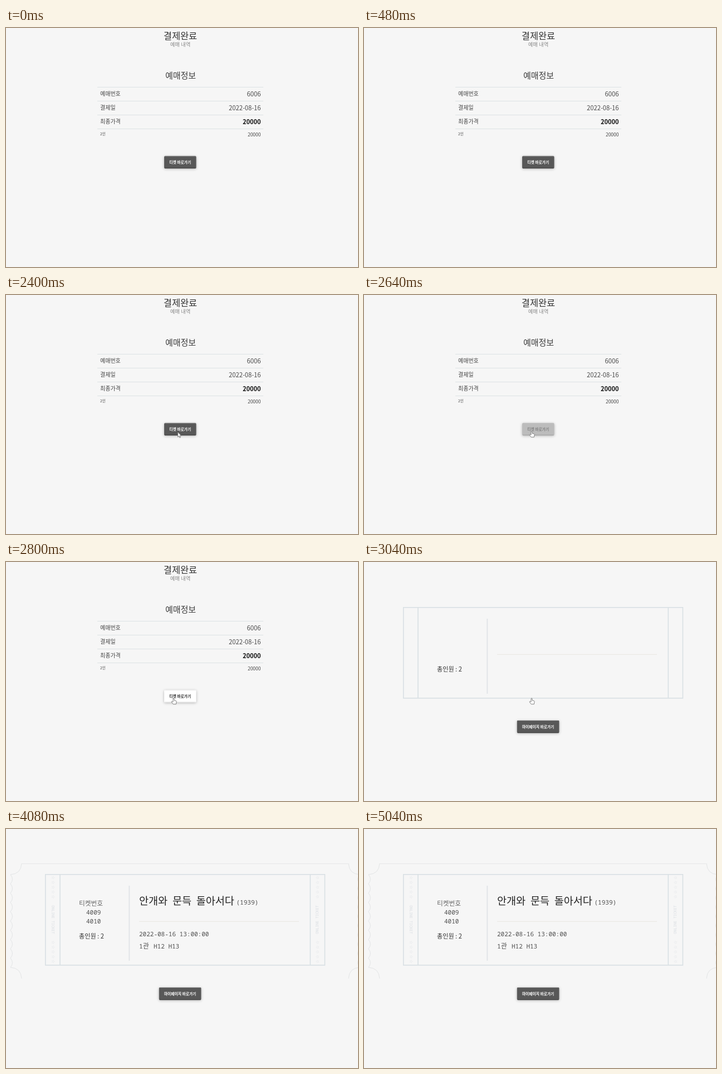
Animation of 632x430 px, one loop 5440 ms. Source, as an HTML page with a canvas:

```html
<!DOCTYPE html>
<html lang="ko">
<head>
<meta charset="utf-8">
<title>예매 티켓</title>
<style>
  html, body { margin: 0; width: 100%; height: 100%; overflow: hidden; background: #f6f6f6; }
  canvas { display: block; }
</style>
</head>
<body>
<canvas id="stage" width="632" height="430"></canvas>
<script>
const ctx = document.getElementById('stage').getContext('2d');
const LOOP = 5440, STEP = 80;
const SANS = '"Noto Sans CJK KR", "Noto Sans CJK", sans-serif';
const MONO = '"Noto Sans Mono", "Noto Sans CJK KR", monospace';
const ARROW = new Path2D('M0 0V8.6L2 6.9L3.4 10L4.7 9.4L3.4 6.4H6Z');
const HAND = new Path2D('M-1 1.2Q0-.5 1 1.2V4.5L4.4 5.3Q5.2 5.7 5 7L4.3 11.3H-.8L-3.8 7.4Q-4-.2+6-2.6 6.2L-1 7.4Z'.replace('Q-4-.2+6-2.6 6.2', 'Q-3.8 5.8-2.6 6.2'));

const mix = (a, b, p) => a + (b - a) * p;
const grey = v => `rgb(${v},${v},${v})`;

// y is the visual middle of the line of text
function text(str, x, y, size, color, { align = 'left', weight = 400, family = SANS, gap = 0 } = {}) {
  ctx.font = `${weight} ${size}px ${family}`;
  ctx.textAlign = align;
  ctx.wordSpacing = gap + 'px';
  ctx.fillStyle = color;
  ctx.fillText(str, x, y + size * 0.37);
}

function line(x1, y1, x2, y2, color, width = 1) {
  ctx.strokeStyle = color;
  ctx.lineWidth = width;
  ctx.beginPath();
  ctx.moveTo(x1, y1);
  ctx.lineTo(x2, y2);
  ctx.stroke();
}

function button(label, x, y, w, h, hover = 0) {
  ctx.save();
  ctx.shadowColor = 'rgba(0,0,0,.28)';
  ctx.shadowBlur = 5;
  ctx.shadowOffsetY = 1;
  ctx.fillStyle = grey(mix(88, 255, hover));
  ctx.beginPath();
  ctx.roundRect(x, y, w, h, 1.5);
  ctx.fill();
  ctx.restore();
  line(x + 1, y + .5, x + w - 1, y + .5, grey(mix(118, 240, hover)));
  line(x + 1, y + h - .5, x + w - 1, y + h - .5, grey(mix(62, 225, hover)));
  text(label, x + w / 2, y + h / 2 - .2, 6.75, grey(mix(255, 45, hover)), { align: 'center', weight: 700 });
}

function cursor(shape, x, y) {
  ctx.save();
  ctx.translate(x, y);
  ctx.fillStyle = '#fff';
  ctx.fill(shape);
  ctx.strokeStyle = '#777';
  ctx.lineWidth = .9;
  ctx.stroke(shape);
  ctx.restore();
}

function receipt(hover) {
  const center = { align: 'center' };
  text('결제완료', 313, 13.5, 16.4, '#333', center);
  text('예매 내역', 313, 30, 9.35, '#888', center);
  text('예매정보', 313.5, 85.5, 15, '#3c3c3c', center);
  const rows = [
    ['예매번호', '6006', 118.5, 10, 11.3, 400, '#4a4a4a'],
    ['결제일', '2022-08-16', 143.5, 10, 11.2, 400, '#4a4a4a'],
    ['최종가격', '20000', 168.5, 10, 11, 700, '#111'],
    ['2인', '20000', 191, 6.6, 8.5, 400, '#444']
  ];
  rows.forEach(([label, value, y, labelSize, valueSize, weight, color], i) => {
    line(164, 106.5 + 25 * i, 462, 106.5 + 25 * i, '#dde2e4');
    text(label, 169, y, labelSize, '#444');
    text(value, 457.5, y + .7, valueSize, color, { align: 'right', weight });
  });
  button('티켓 바로가기', 284, 230.5, 57.5, 22, hover);
}

function ticketFrame() {
  const blue = '#d9e0e4';
  ctx.strokeStyle = blue;
  ctx.lineWidth = 1.6;
  ctx.strokeRect(70.8, 81.8, 501.6, 163.2);
  line(97, 82, 97, 245, blue, 1.6);
  line(546.3, 82, 546.3, 245, blue, 1.6);
  line(221.3, 102, 221.3, 237, '#e2e5e8', 2);
  line(239, 166.3, 526, 166.3, '#e9e6e2');
  text('총인원 : 2', 131, 193, 11.1, '#333', { weight: 500 });
  button('마이페이지 바로가기', 274.8, 285, 75.6, 22.5);
}

// One perforated end of the ticket; dir is +1 on the left, -1 on the right
function ticketEdge(x, dir) {
  const pitch = 167 / 10;
  ctx.beginPath();
  ctx.moveTo(x + 20 * dir, 62);
  ctx.quadraticCurveTo(x + 19 * dir, 81, x, 82);
  for (let i = 0; i < 10; i++) {
    const y = 82 + i * pitch;
    ctx.quadraticCurveTo(x + 7 * dir, y + pitch / 2, x, y + pitch);
  }
  ctx.quadraticCurveTo(x + 19 * dir, 250, x + 20 * dir, 269);
  ctx.stroke();
}

function sideLabel(x, turn) {
  const color = '#d9dde2', center = { align: 'center', family: MONO };
  ctx.save();
  ctx.translate(x, 163);
  ctx.rotate(turn * Math.PI / 2);
  text('ONLINE TICKET', 0, 0, 6.6, color, center);
  for (let i = 0; i < 5; i++) {
    for (const side of [-1, 1]) {
      text('☆', side * (41 + 8.6 * i), 0, 8, color, { align: 'center', family: '"DejaVu Sans", sans-serif' });
    }
  }
  ctx.restore();
}

function ticketDetails() {
  ctx.strokeStyle = '#e3e5e6';
  ctx.lineWidth = 1;
  ticketEdge(8, 1);
  ticketEdge(635, -1);
  line(28, 62.5, 615, 62.5, '#e6e7e8');
  sideLabel(84.5, 1);
  sideLabel(559, -1);

  const mono = { family: MONO }, ink = '#505050';
  text('티켓번호', 131, 133.3, 11.7, '#666', { weight: 300 });
  text('4009', 144, 150, 11, ink, mono);
  text('4010', 144, 166, 11, ink, mono);
  text('안개와 문득 돌아서다', 239, 129, 18.5, '#222', { weight: 500, gap: 4.7 });
  text('(1939)', 413.5, 131.5, 11, ink, mono);
  text('2022-08-16 13:00:00', 239, 189.3, 11, ink, mono);
  text('1', 239, 210.5, 11, ink, mono);
  text('관', 245.7, 210.3, 12, ink, { weight: 300 });
  text('H12 H13', 265, 210.5, 11, ink, mono);
}

function pointer(t) {
  if (t < 2000 || t >= 3600) return;
  if (t < 2480) {
    const p = 1 - (1 - (t - 2000) / 480) ** 2;
    cursor(ARROW, mix(574, 301, p), mix(312, 245, p));
  } else if (t < 3360) {
    cursor(HAND, 301, 244.5);
  } else {
    const p = ((t - 3280) / 240) ** 1.4;
    cursor(ARROW, mix(301, 546, p), mix(245, 296, p));
  }
}

function draw(now) {
  const t = Math.floor((now % LOOP) / STEP) * STEP;
  ctx.fillStyle = '#f6f6f6';
  ctx.fillRect(0, 0, 632, 430);
  if (t < 3040) {
    const p = Math.min(1, Math.max(0, (t - 2480) / 320));
    receipt(p * (1.4 - .4 * p));
  } else {
    ticketFrame();
    if (t >= 3120) ticketDetails();
  }
  pointer(t);
}

const start = performance.now();
function tick() {
  draw(performance.now() - start);
  requestAnimationFrame(tick);
}
tick();
</script>
</body>
</html>
```
